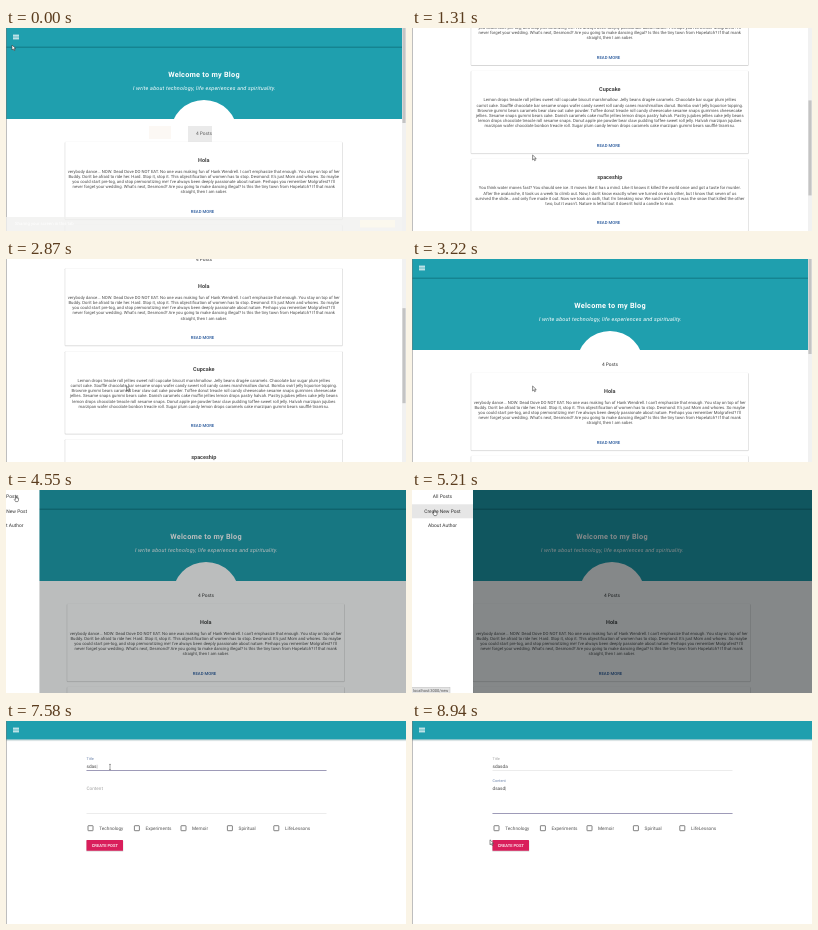
An HTML page that plays this animation: 400x203 px, repeating every 8970 ms.

```html
<!DOCTYPE html>
<html lang="en">
<head>
<meta charset="utf-8">
<title>Blog walkthrough</title>
<style>
  html, body { margin: 0; width: 100%; height: 100%; overflow: hidden; background: #fff; }
  svg { display: block; width: 100%; height: 100%; }
  text { font-family: Roboto, "Open Sans", sans-serif; text-rendering: geometricPrecision; white-space: pre; }
</style>
</head>
<body>
<svg id="stage" viewBox="0 0 400 203"></svg>
<script>
const LOOP = 8970, MAX_SCROLL = 229, VIEW = 203;
const TEAL = '#1f9fae';

const cards = [
  { title: 'Hola', top: 114, lines: [
    "verybody dance... NOW. Dead Dove DO NOT EAT. No one was making fun of Hank Wendrell. I can't emphasize that enough. You stay on top of her",
    "Buddy. Don't be afraid to ride her. Hard. Stop it, stop it. This objectification of women has to stop. Desmond: It's just Mom and whores. So maybe",
    "you could start pre-tog, and stop premorotizing me! I've always been deeply passionate about nature. Perhaps you remember Molgrafest? I'll",
    "never forget your wedding. What's next, Desmond? Are you going to make dancing illegal? Is this the tiny town from Hopelatch? If that mank",
    "straight, then I am sober."] },
  { title: 'Cupcake', top: 197, lines: [
    "Lemon drops treacle roll jellies sweet roll cupcake biscuit marshmallow. Jelly beans dragée caramels. Chocolate bar sugar plum jellies",
    "carrot cake. Soufflé chocolate bar sesame snaps wafer candy sweet roll candy canes marshmallow donut. Bomba swirl jelly liquorice topping.",
    "Brownie gummi bears caramels bear claw oat cake powder. Toffee donut treacle roll candy cheesecake sesame snaps gummies cheesecake",
    "jellies. Sesame snaps gummi bears cake. Danish caramels cake muffin jellies lemon drops pastry halvah. Pastry jujubes jellies cake jelly beans",
    "lemon drops chocolate treacle roll sesame snaps. Donut apple pie powder bear claw pudding toffee sweet roll jelly. Halvah marzipan jujubes",
    "marzipan wafer chocolate bonbon treacle roll. Sugar plum candy lemon drops caramels cake marzipan gummi bears soufflé tiramisu."] },
  { title: 'spaceship', top: 285, lines: [
    "You think water moves fast? You should see ice. It moves like it has a mind. Like it knows it killed the world once and got a taste for murder.",
    "After the avalanche, it took us a week to climb out. Now, I don't know exactly when we turned on each other, but I know that seven of us",
    "survived the slide... and only five made it out. Now we took an oath, that I'm breaking now. We said we'd say it was the snow that killed the other",
    "two, but it wasn't. Nature is lethal but it doesn't hold a candle to man."] },
  { title: 'hey', top: 362, lines: ["bro what's up"] }
];

// y is the middle of the capitals
const text = (x, y, size, str, attrs = '') =>
  `<text x="${x}" y="${y + size * 0.355}" font-size="${size}" ${attrs}>${str}</text>`;
const rect = (x, y, w, h, fill, attrs = '') =>
  `<rect x="${x}" y="${y}" width="${w}" height="${h}" fill="${fill}" ${attrs}/>`;
const MID = 'text-anchor="middle" ';

function card({ title, top, lines }) {
  const last = top + 29 + (lines.length - 1) * 5.17;
  const height = last + 27.5 - top;
  return rect(58.6, top - 0.2, 278.2, height + 1.2, '#000', 'rx="1" opacity=".07"') +
    rect(58.8, top + 0.2, 277.8, height + 0.4, '#000', 'rx=".8" opacity=".13"') +
    rect(59.2, top, 277, height, '#fff', 'rx=".6"') +
    text(197.8, top + 18, 5.5, title, MID + 'font-weight="700" fill="#444"') +
    lines.map((s, i) => text(197.8, top + 29 + i * 5.17, 4.26, s, MID + 'fill="#4c4c4c"')).join('') +
    text(196.5, last + 19.5, 4.25, 'READ MORE', MID + 'font-weight="500" fill="#2a5a9c"');
}

const burger = [7.2, 9, 10.8].map(y => rect(7, y - 0.5, 6, 1, '#fff')).join('');
const nav = rect(0, 0, 400, 18.6, TEAL) + burger;

const home = rect(0, 0, 400, 440, '#fff') + rect(-4, 0, 408, 91, TEAL) +
  rect(-4, 18.7, 408, 0.9, '#10737f') +
  `<circle cx="198" cy="105.5" r="33.5" fill="#fff"/>` +
  text(198, 46.5, 7.3, 'Welcome to my Blog', MID + 'font-weight="700" letter-spacing=".25" fill="#fff"') +
  text(198.4, 60, 5.4, 'I write about technology, life experiences and spirituality.',
    MID + 'font-style="italic" letter-spacing=".2" fill="#fff"') +
  text(198, 105, 4.8, '4 Posts', MID + 'fill="#333"') +
  cards.map(card).join('');

const boxes = [[82, 93.3, 'Technology'], [128.4, 139.5, 'Experiments'], [175, 186, 'Memoir'],
  [221.4, 232.6, 'Spiritual'], [267.8, 279, 'LifeLessons']];
const form = rect(0, 0, 400, 203, '#fff') + nav +
  rect(0, 18.6, 400, 0.9, '#9db9bd') + rect(0, 19.5, 400, 0.7, '#e9eeee') +
  rect(80.5, 49.3, 240, 0.5, '#d8d8d8') + rect(80.5, 92.4, 240, 0.5, '#d8d8d8') +
  '<g id="titleField"></g><g id="contentField"></g>' +
  boxes.map(([x, lx, s]) => rect(x, 104.7, 5, 5, 'none', 'rx=".4" stroke="#5a5a5a" stroke-width=".75"') +
    text(lx, 107.2, 4.7, s, 'fill="#555"')).join('') +
  rect(80.3, 119.6, 37, 11, '#000', 'rx=".6" opacity=".18"') +
  rect(80.5, 119, 36.5, 10.8, '#d91e5b', 'rx=".6"') +
  text(98.8, 124.6, 4.1, 'CREATE POST', MID + 'font-weight="500" fill="#fff"');

const items = ['All Posts', 'Create New Post', 'About Author'];
const drawer = rect(0, 0, 61, 203, '#fff') +
  rect(0, 0, 61, 14, '#e6e6e6', 'id="hover"') +
  items.map((s, i) => text(30.5, 6.7 + i * 14.5, 4.9, s, MID + 'fill="#333"')).join('');

const intro = rect(0, 189, 396, 14, '#f1f1ef', 'opacity=".8"') +
  text(9, 195.5, 4.4, 'Sharing your screen in this tab', 'fill="#fff"') +
  rect(354, 192, 35, 7.5, '#fbf8ee') +
  rect(182, 98, 24, 16, '#bbb', 'opacity=".3"') +
  rect(143, 98, 22, 13, '#f3e6da', 'opacity=".3"');

const arrow = '<path d="M0 0V5L1.2 3.9 2 5.7 2.9 5.3 2.1 3.6H3.7Z" fill="#fff" stroke="#333" stroke-width=".55"/>';
const hand = '<path d="M-.5 .3Q0 -.3 .5 .3V2L2.6 2.5 2.4 4.6 1.8 5.6H-.4L-1.7 3.4 -1.2 2.9 -.5 3.4Z" fill="#fff" stroke="#222" stroke-width=".5"/>';
const beam = '<path d="M-.9 -2.6H.9M0 -2.6V2.6M-.9 2.6H.9" fill="none" stroke="#444" stroke-width=".5"/>';

const stage = document.getElementById('stage');
stage.innerHTML = `<g id="home">${home}</g><g id="homeNav">${burger}</g><g id="form">${form}</g>` +
  `<g id="bar">${rect(396, 0, 4, 203, '#f1f1f1')}${rect(396.4, 0, 3.2, 95, '#c4c4c4', 'id="thumb"')}</g>` +
  rect(0, 0, 0.9, 203, '#707070', 'opacity=".5"') +
  rect(0, 0, 400, 203, '#00080a', 'id="shade"') +
  `<g id="drawer">${drawer}</g>` +
  `<g id="status">${rect(-1, 197.2, 39, 7, '#e4e4e4', 'stroke="#b5b5b5" stroke-width=".4"')}` +
  `<text id="link" x="1" y="201.7" font-size="4" fill="#555"></text></g>` +
  `<g id="intro">${intro}</g>` +
  `<g id="pointer"><g id="arrow">${arrow}</g><g id="hand">${hand}</g><g id="beam">${beam}</g></g>`;

const el = id => document.getElementById(id);
const show = (id, on) => el(id).setAttribute('display', on ? 'inline' : 'none');
const set = (id, name, value) => el(id).setAttribute(name, value);

// progress 0..1 in n equal jumps, the first at t0 and the last at t1
function steps(t, t0, t1, n) {
  if (t < t0) return 0;
  return Math.min(n, Math.floor((t - t0) / ((t1 - t0) / (n - 1)) + 1e-6) + 1) / n;
}
const soft = p => p * p * (3 - 2 * p);
const out = p => 1 - (1 - p) ** 2;
const glide = p => 0.58 * soft(p) + 0.42 * p;

// start, end, jumps, x, y
const moves = [
  [50, 250, 6, 108, 52], [400, 520, 4, 120.6, 127], [3640, 3800, 5, 22, 29.5],
  [4000, 4300, 6, 10, 6], [4860, 5110, 6, 22.5, 20], [5660, 6090, 9, 116.6, 52.5],
  [6230, 6430, 5, 104, 46], [8120, 8270, 4, 104, 72], [8820, 8940, 4, 78, 118.8]
];
function pointerAt(t) {
  let x = 6, y = 17;
  for (const [t0, t1, n, nx, ny] of moves) {
    const p = soft(steps(t, t0, t1, n));
    x += (nx - x) * p;
    y += (ny - y) * p;
  }
  return [x, y];
}

const titleKeys = [6970, 7120, 7270, 7470, 7670, 7870];
const contentKeys = [8570, 8670, 8820, 8870, 8920];
const typed = (word, keys, t) => word.slice(0, keys.filter(k => t >= k).length);

function field(id, t, label, word, keys, y, lineY, focus, blur) {
  const up = out(steps(t, focus, focus + 200, 5));
  const active = t >= focus && t < blur;
  const value = typed(word, keys, t);
  const size = 4.7 - up * 0.9;
  const caret = active ? '<tspan fill="#222" font-weight="300">|</tspan>' : '';
  el(id).innerHTML =
    text(80.5, y - up * 7.6, size, label, `fill="${active ? '#6d84ab' : '#a3a3a3'}"`) +
    text(80.5, y + 0.4, 4.7, value + caret, 'fill="#444"') +
    (active ? rect(80.5, lineY, 240, 0.8, '#8b88ac', `opacity="${up}"`) : '');
}

function render(t) {
  const onForm = t >= 5460;
  const scroll = MAX_SCROLL * (glide(steps(t, 1010, 1510, 11)) - glide(steps(t, 2520, 3220, 15)));
  const open = out(steps(t, 4500, 4750, 6)) - out(steps(t, 5410, 5660, 6));
  const locked = t >= 4500;

  show('home', !onForm);
  show('homeNav', !onForm);
  show('form', onForm);
  show('bar', !locked);
  set('home', 'transform', `translate(${locked ? 2 : 0} ${-scroll})`);
  set('homeNav', 'transform', `translate(0 ${-scroll})`);
  set('thumb', 'y', scroll * VIEW / (VIEW + MAX_SCROLL));

  set('shade', 'opacity', open * 0.48);
  set('drawer', 'transform', `translate(${-62 * (1 - open)} 0)`);

  const [x, y] = pointerAt(t);
  const row = y < 14 ? 0 : y < 28.5 ? 1 : 2;
  const hovering = t >= 4750 && t < 5460;
  show('hover', hovering);
  set('hover', 'y', row * 14.3);
  show('status', hovering && t >= 4900);
  el('link').textContent = 'localhost:3000/' + ['', 'new', 'about'][row];

  const shape = t >= 4200 && t < 5560 ? 'hand' : t >= 6330 && t < 8860 ? 'beam' : 'arrow';
  for (const s of ['arrow', 'hand', 'beam']) show(s, s === shape);
  set('pointer', 'transform', `translate(${x} ${y})`);

  if (onForm) {
    field('titleField', t, 'Title', 'sdasda', titleKeys, 45.2, 49.2, 6530, 8320);
    field('contentField', t, 'Content', 'dsasd', contentKeys, 67, 92.2, 8320, LOOP);
  }
  set('intro', 'opacity', 1 - steps(t, 50, 250, 6));
}

const start = performance.now();
function tick() {
  render((performance.now() - start) % LOOP);
  requestAnimationFrame(tick);
}
tick();
</script>
</body>
</html>
```
